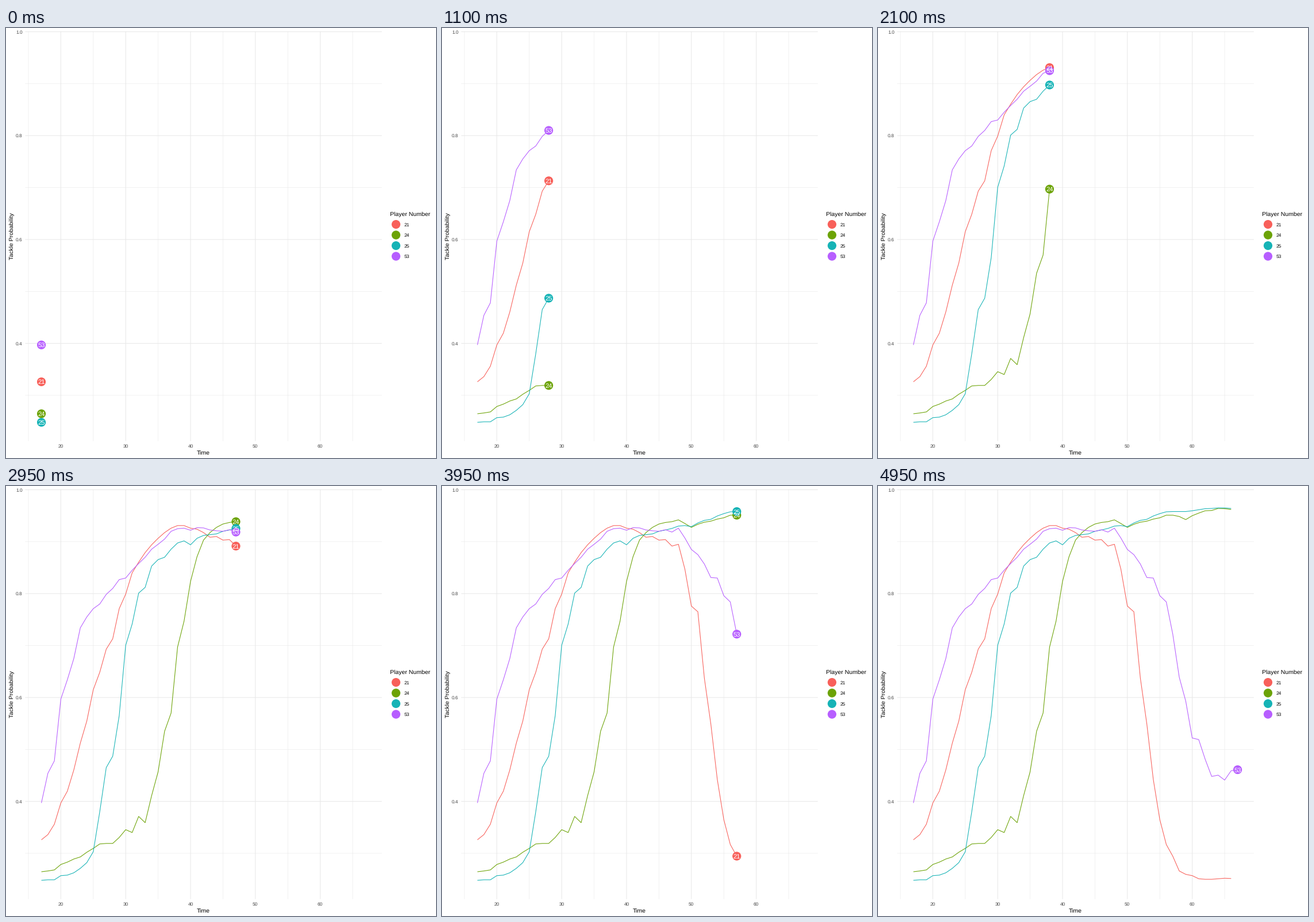
Animation, 748 px wide and 748 px high, one loop 5000 ms. Source, as a matplotlib script:

```python
import matplotlib.pyplot as plt
import numpy as np
from matplotlib.animation import FuncAnimation
from matplotlib.patches import Circle

SIZE, DPI = 748, 64
FRAMES, INTERVAL = 100, 50
PT = 72 / DPI  # points per pixel
START, END = 17, 67
RADIUS = 7.6
GRID, TICK = "#e9e9e9", "#444444"

plt.rcParams["font.family"] = "Liberation Sans"
plt.rcParams["text.hinting"] = "none"

# Tackle probability in thousandths, one value per time step
p21 = [326, 336, 356, 397, 419.5, 460.5, 512, 554.5, 615, 648.5,
       693, 713, 771, 799, 840, 860.5, 879, 894, 906.5, 917.5,
       926, 931, 931, 926, 924, 917.5, 908.5, 910, 903, 904,
       891.5, 895, 847, 776, 765, 637.5, 549, 442, 365, 317,
       294.5, 266, 259.5, 257, 251, 250, 250, 251, 252, 251.5]
p24 = [264.5, 266, 268, 278.5, 283, 289, 293, 302, 309.5, 318,
       319, 319, 330.5, 345.5, 340, 371, 359, 411, 457, 535,
       570, 697, 747, 823.5, 871, 903, 917.5, 927.5, 934, 937,
       938.5, 942, 935, 927.5, 933.5, 937.5, 939.5, 943.5, 946, 951,
       951, 948.5, 942.5, 950, 955, 959.5, 960, 964, 963.5, 962]
p25 = [248, 249, 249, 257, 258, 262.5, 271, 282, 303, 380,
       465, 487, 565, 700.5, 741.5, 801, 812, 853, 865.5, 870,
       885.5, 897.5, 901.5, 894, 906.5, 912, 913.5, 915, 920, 922.5,
       925.5, 930, 931, 929, 936, 941, 943, 949.5, 954, 957.5,
       958, 958, 958, 959.5, 961.5, 963.5, 964, 965, 965, 964]
p53 = [397, 454, 478, 597, 634, 675, 734, 755, 771, 780,
       798.5, 810, 827, 830, 845, 858, 870, 885.5, 895, 905,
       920, 925, 926, 922, 927, 926.5, 922.5, 921, 920, 923,
       918.5, 926, 907, 885, 875, 857, 831, 830, 796, 784,
       722, 639, 593, 522, 519, 481, 448, 450.5, 441, 459, 461]


def px(time):
    return 95.4 + (time - 20) * 11.28


def py(prob):
    return 6.5 + (1 - prob) * 903.5


fig = plt.figure(figsize=(SIZE / DPI, SIZE / DPI), dpi=DPI, facecolor="white")
ax = fig.add_axes([0, 0, 1, 1])
ax.set(xlim=(0, SIZE), ylim=(SIZE, 0))
ax.axis("off")


def label(x, y, text, size, color="black", ha="center", **kw):
    return ax.text(x, y, text, fontsize=size * PT, color=color, ha=ha,
                   va="baseline", **kw)


def grid_line(xs, ys, width):
    ax.plot(xs, ys, color=GRID, lw=width * PT, solid_capstyle="butt",
            snap=False, zorder=1)


left, right = px(14.5), px(69.5)
top, bottom = 5.7, 718.6

for t in range(15, 70, 5):
    major = t % 10 == 0
    grid_line([px(t)] * 2, [top, bottom], 1.07 if major else 0.6)
    if major:
        label(px(t), 729.6, str(t), 8.4, TICK)

for tenth in range(3, 11):
    major = tenth % 2 == 0
    y = py(tenth / 10)
    grid_line([left, right], [y, y], 1.07 if major else 0.6)
    if major:
        label(28.8, y + 3, f"{tenth / 10:.1f}", 8.4, TICK, "right")

label((left + right) / 2, 741.8, "Time", 10.45)
label(13, (top + bottom) / 2 + 0.3, "Tackle Probability", 10.45,
      rotation=90, rotation_mode="anchor")
label(668.4, 326.6, "Player Number", 10.45, ha="left")


class Player:
    def __init__(self, number, color, values, row):
        y = 341.6 + 18.5 * row
        ax.add_patch(Circle((678.4, y), RADIUS, fc=color, lw=0))
        label(692.6, y + 3.2, number, 8.4, ha="left")

        steps = np.arange(len(values))
        self.keys = np.round(steps * (FRAMES - 1) / (END - START))
        self.xs = px(START + steps)
        self.ys = py(np.array(values) / 1000)
        self.line, = ax.plot([], [], color=color, lw=1.07 * PT, zorder=2,
                             solid_capstyle="butt", solid_joinstyle="round")
        self.dot = ax.add_patch(Circle((0, 0), RADIUS, fc=color, lw=0,
                                       zorder=3 + row / 10))
        self.tag = label(0, 0, number, 11.2, "white", zorder=4)

    def show(self, frame):
        x = np.interp(frame, self.keys, self.xs)
        y = np.interp(frame, self.keys, self.ys)
        past = self.keys <= frame
        self.line.set_data(np.append(self.xs[past], x),
                           np.append(self.ys[past], y))
        self.dot.set_center((x, y))
        self.tag.set_position((x, y + 4))
        active = frame <= self.keys[-1]
        self.dot.set_visible(active)
        self.tag.set_visible(active)


players = [
    Player("21", "#f8605a", p21, 0),
    Player("24", "#6ca306", p24, 1),
    Player("25", "#16b3b6", p25, 2),
    Player("53", "#b75eff", p53, 3),
]


def update(frame):
    for player in players:
        player.show(frame)
    return []


anim = FuncAnimation(fig, update, frames=FRAMES, interval=INTERVAL,
                     repeat=True, repeat_delay=0, blit=False)
plt.show()
```
